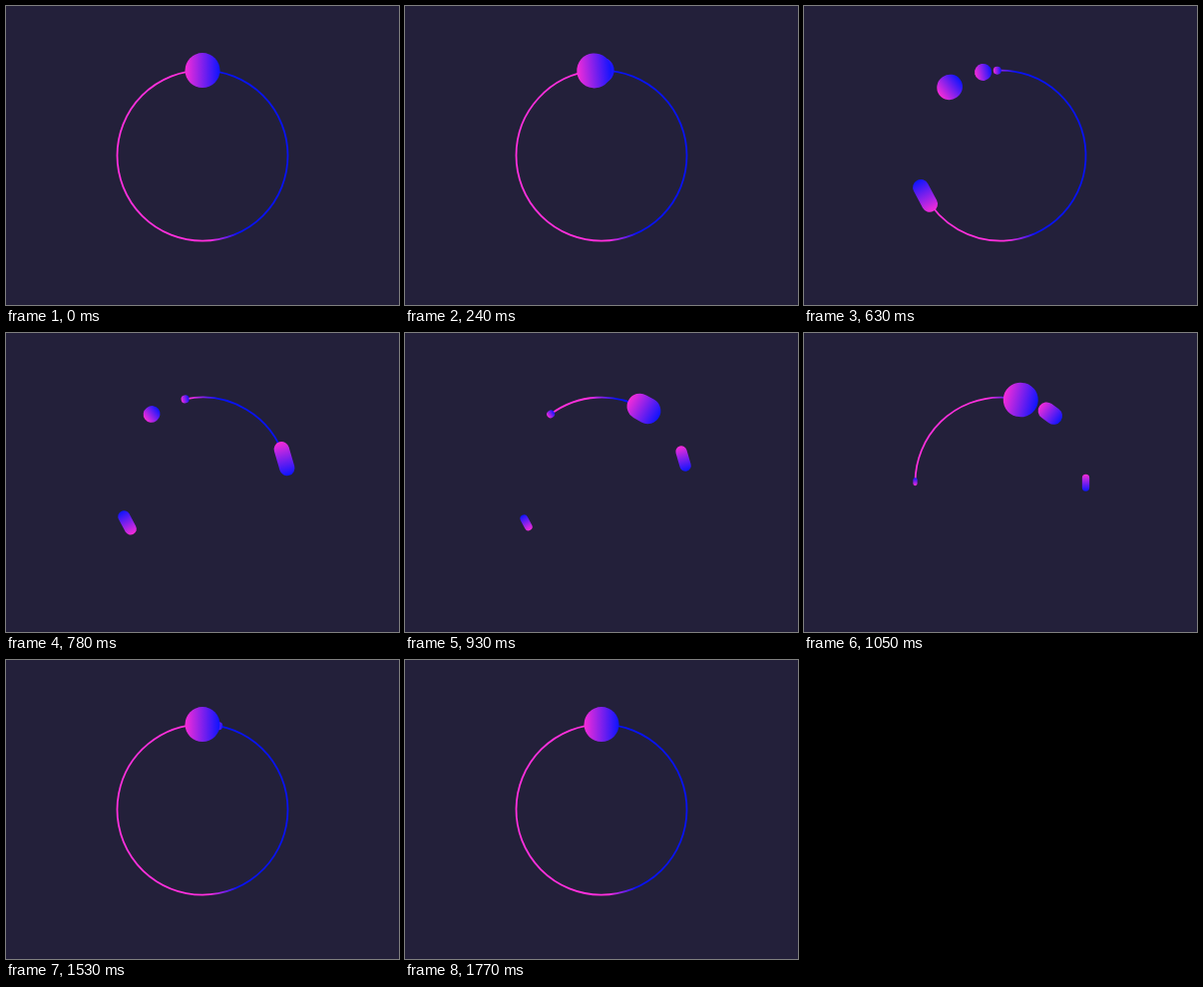
An HTML page with a canvas for the animation above (1860 ms loop, 394 by 300 pixels).

```html
<!DOCTYPE html>
<html lang="en">
<head>
<meta charset="utf-8">
<title>Ring loader</title>
<style>
  html, body { margin: 0; width: 100%; height: 100%; overflow: hidden; background: #23203a; }
  canvas { display: block; }
</style>
</head>
<body>
<canvas id="stage" width="394" height="300"></canvas>
<script>
const ctx = document.getElementById('stage').getContext('2d');
const LOOP = 1860, STEP = 30, LAST = 1770;
const START = 45, TRAVEL = 1350, DELAY = 150;
const CX = 197, CY = 150.1, R = 85.5;
const DIAMETERS = [35, 26, 17, 8];
const BG = '#23203a', PINK = '#f62cd8', BLUE = '#0c14ff';

const clamp = x => Math.min(1, Math.max(0, x));
const smooth = (a, b, t) => {
  const p = clamp((t - a) / (b - a));
  return p * p * (3 - 2 * p);
};

// cubic-bezier(.8, 0, .1, 1), solved by bisection
function ease(x) {
  if (x <= 0 || x >= 1) return clamp(x);
  let lo = 0, hi = 1, u;
  for (let i = 0; i < 30; i++) {
    u = (lo + hi) / 2;
    const v = 1 - u;
    if (2.4 * u * v * v + 0.3 * u * u * v + u * u * u < x) lo = u; else hi = u;
  }
  return u * u * (3 - 2 * u);
}

function gradient(x0, y0, x1, y1, from, to) {
  const g = ctx.createLinearGradient(x0, y0, x1, y1);
  g.addColorStop(0, from);
  g.addColorStop(1, to);
  return g;
}

const ringPaint = gradient(194, 151.7, 222, 148.3, '#ff2fdc', '#0812f2');

// Counterclockwise angle from the top
const angleAt = t => 2 * Math.PI * ease((t - START) / TRAVEL);
// Radial thickness relative to length
const squash = t => 1 - 0.57 * (smooth(440, 660, t) - smooth(760, 1080, t));

function drawBall(size, t) {
  const h = size * squash(t);
  ctx.save();
  ctx.translate(CX, CY);
  ctx.rotate(-angleAt(t));
  ctx.translate(0, -R);
  ctx.fillStyle = gradient(-size / 2, 0, size / 2, 0, PINK, BLUE);
  ctx.beginPath();
  ctx.roundRect(-size / 2, -h / 2, size, h, h / 2);
  ctx.fill();
  ctx.restore();
}

function draw(t) {
  ctx.fillStyle = BG;
  ctx.fillRect(0, 0, 394, 300);

  // The ring is open between the last ball and the first one
  const top = -Math.PI / 2;
  ctx.strokeStyle = ringPaint;
  ctx.lineWidth = 1.8;
  ctx.beginPath();
  ctx.arc(CX, CY, R, top - angleAt(t - 3 * DELAY), top - angleAt(t) + 2 * Math.PI);
  ctx.stroke();

  for (let i = DIAMETERS.length - 1; i >= 0; i--) drawBall(DIAMETERS[i], t - i * DELAY);
}

const origin = performance.now();
function frame() {
  const t = (performance.now() - origin) % LOOP;
  draw(Math.min(LAST, Math.floor(t / STEP) * STEP));
  requestAnimationFrame(frame);
}
frame();
</script>
</body>
</html>
```
